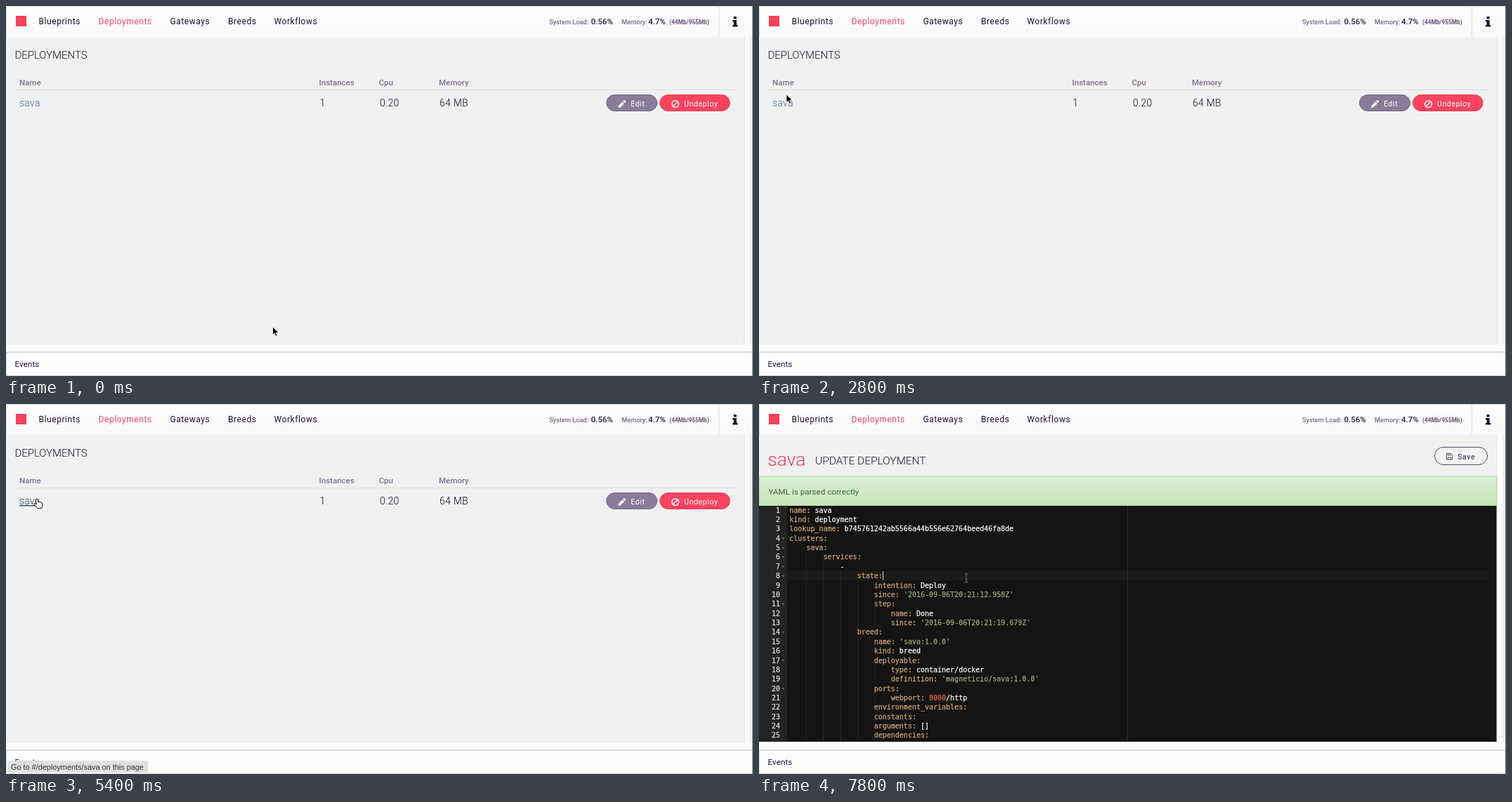
An HTML page that plays this animation: 1063x527 px, repeating every 8000 ms.

```html
<!DOCTYPE html>
<html lang="en">
<head>
<meta charset="utf-8">
<title>Deployments</title>
<style>
html, body { margin: 0; width: 100%; height: 100%; overflow: hidden; background: #fff; }
svg { display: block; width: 1063px; height: 527px; }
text { font-family: Roboto, Arial, sans-serif; white-space: pre; }
.nav { font-size: 12px; letter-spacing: .57px; fill: #1d0f2c; }
.title { font-size: 15px; font-weight: 300; letter-spacing: -.04px; fill: #1d1326; }
.head { font-size: 11.5px; font-weight: 500; fill: #7f7190; }
.cell { font-size: 14px; font-weight: 300; letter-spacing: .25px; fill: #180c24; }
.btn { font-size: 10.5px; letter-spacing: .6px; fill: #fff; }
.label { font-size: 9.2px; font-weight: 500; fill: #74668a; }
.stat { font-size: 11.5px; font-weight: 500; fill: #2b2136; }
.code { font: 10px "DejaVu Sans Mono", monospace; }
.code, .code tspan { fill: currentColor; stroke: currentColor; stroke-width: .25px; }
.code { color: #f8f8f8; }
.key { color: #c7a474; }
.str { color: #9ba77c; }
.num { color: #d9694c; }
</style>
</head>
<body>
<svg id="stage" viewBox="0 0 1063 527"></svg>
<script>
const LOOP = 8000, STEP = 200, ROW = 13.37, CHAR = 6.02, LEFT = 43.3;

const text = (x, y, cls, str, extra = '') => `<text x="${x}" y="${y}" class="${cls}" ${extra}>${str}</text>`;
const rect = (x, y, w, h, fill, extra = '') =>
  `<rect x="${x}" y="${y}" width="${w}" height="${h}" fill="${fill}" ${extra}/>`;
const line = (d, stroke, extra = '') => `<path d="${d}" fill="none" stroke="${stroke}" ${extra}/>`;

const yaml = `name: sava
kind: deployment
lookup_name: b745761242ab5566a44b556e62764beed46fa8de
clusters:
    sava:
        services:
            -
                state:
                    intention: Deploy
                    since: '2016-09-06T20:21:12.958Z'
                    step:
                        name: Done
                        since: '2016-09-06T20:21:19.679Z'
                breed:
                    name: 'sava:1.0.0'
                    kind: breed
                    deployable:
                        type: container/docker
                        definition: 'magneticio/sava:1.0.0'
                    ports:
                        webport: 8080/http
                    environment_variables:
                    constants:
                    arguments: []
                    dependencies:
                environment_variables:`.split('\n');
const folds = [4, 5, 6, 7, 8, 11, 14, 17, 20];

const span = (cls, str) => `<tspan class="${cls}">${str}</tspan>`;
const paint = src => src
  .replace(/'.*'/, s => span('str', s))
  .replace(/\b8080\b/, s => span('num', s))
  .replace(/^( *)(\w+:)/, (_, pad, key) => pad + span('key', key));

function codeRow(src, i) {
  const y = 154.6 + i * ROW, top = 144.3 + i * ROW;
  const indent = src.search(/\S/);
  let out = text(30, y, 'code', i + 1, 'text-anchor="end" style="color:#dcdcdc"');
  if (folds.includes(i + 1)) out += `<path d="M32.5 ${y - 4.2}h4l-2 2.4z" fill="#777"/>`;
  for (let c = 4; c < indent; c += 4)
    out += line(`M${Math.round(LEFT + c * CHAR) + .5} ${top}v${ROW}`, '#272727');
  return out + text(LEFT, y, 'code', paint(src));
}

const header = `
  ${rect(0, 0, 1063, 44, 'url(#bar)')}
  ${line('M.5 44V.5H1063', '#d8d8d8')}
  ${line('M1014.5 1V44', '#dedede')}
  ${rect(14, 14, 15, 15, '#f3425f')}
  ${text(46.5, 26, 'nav', 'Blueprints')}
  ${text(131.5, 26, 'nav', 'Deployments', 'style="fill:#ee4a68"')}
  ${text(233.5, 26, 'nav', 'Gateways')}
  ${text(316, 26, 'nav', 'Breeds')}
  ${text(381.5, 26, 'nav', 'Workflows')}
  ${text(773, 26, 'label', 'System Load:')}
  ${text(832.5, 26, 'stat', '0.56%')}
  ${text(876, 26, 'label', 'Memory:')}
  ${text(914, 26, 'stat', '4.7%')}
  ${text(944, 26, 'label', '(44Mb/955Mb)', 'style="font-size:8.3px;font-weight:700;fill:#65547a"')}
  <path d="M1035.5 15h4v3.4h-4zM1034 20h5.6v7h1.6v2.4h-7.2V27h1.6v-4.6H1034z" fill="#1b0d2b"/>`;

const footer = `
  ${rect(0, 482, 1063, 11, '#fcfcfc')}
  ${line('M0 493H1063', '#d3d3d3', 'stroke-width="1.5"')}
  ${rect(0, 494, 1063, 33, '#fefefd')}
  ${text(12.5, 514, 'nav', 'Events', 'style="font-size:11.5px;letter-spacing:.15px"')}
  ${line('M0 526.5H1063', '#d0d0d0')}
  ${line('M.5 494V527', '#d8d8d8')}
  ${line('M1062.5 0V527', '#56705a')}`;

const list = `
  ${text(12.5, 74.5, 'title', 'DEPLOYMENTS')}
  ${text(19, 113, 'head', 'Name')}
  ${text(445.5, 113, 'head', 'Instances')}
  ${text(530.5, 113, 'head', 'Cpu')}
  ${text(616, 113, 'head', 'Memory')}
  ${line('M12 119.5H1038', '#d4d4d4', 'stroke-dasharray="2 1"')}
  ${text(19, 143, 'cell', 'sava', 'id="link"')}
  ${text(446.5, 143, 'cell', '1')}
  ${text(532, 143, 'cell', '0.20')}
  ${text(617, 143, 'cell', '64 MB')}
  ${rect(854.5, 126.5, 72, 23, '#897b9a', 'rx="11.5" stroke="#776a87"')}
  <path d="M871 145l.8-3.3 5.4-5.4 2.6 2.6-5.4 5.4zM878 135.5l1-1q.9-.7 1.7 0l1 1q.7.9 0 1.7l-1 1z" fill="#fff"/>
  ${text(889, 143, 'btn', 'Edit')}
  ${rect(930.5, 126.5, 99.5, 23, '#fb4360', 'rx="11.5" stroke="#e2455d"')}
  <circle cx="952.5" cy="139.5" r="4.8" fill="none" stroke="#fff" stroke-width="1.5"/>
  ${line('M949.2 142.8l6.6-6.6', '#fff', 'stroke-width="1.5"')}
  ${text(965, 143, 'btn', 'Undeploy')}`;

const editor = `
  ${rect(1051, 44, 7, 438, '#fdfdfd')}
  ${text(12.5, 87.5, 'title', 'sava', 'style="font-size:26.4px;fill:#e63f5e"')}
  ${text(80, 85.5, 'title', 'UPDATE DEPLOYMENT', 'style="font-size:15.5px"')}
  ${rect(961.5, 61.5, 75, 25, '#f4f4f4', 'rx="12.5" stroke="#51465f"')}
  ${line('M978.5 70.5h6l2 2v6.5h-8zM980.5 70.5v2.5h3.5v-2.5M980.5 79v-3h4v3', '#5a5066')}
  ${text(994, 78.5, 'btn', 'Save', 'style="fill:#554b61;font-weight:500"')}
  ${rect(.5, 103, 1049, 41.5, 'url(#ok)', 'stroke="#b6dba8"')}
  ${text(13.5, 129, 'nav', 'YAML is parsed correctly', 'style="font-size:11.6px;letter-spacing:.03px;fill:#386a40"')}
  <g clip-path="url(#pane)">
    ${rect(0, 144, 1050, 338, '#141414')}
    ${rect(0, 144, 40, 338, '#232323')}
    ${rect(40, 144.3, 997, ROW, '#1b1b1b', 'id="active"')}
    ${line('M524.5 144V482', '#2a2a2a')}
    ${yaml.map(codeRow).join('')}
    <path id="caret" d="M.5 .5v12.5" stroke="#ddd"/>
  </g>`;

const pointers = `
  <path id="arrow" d="M0 0V11.6L2.7 9.1 4.6 13.2 6.6 12.3 4.8 8.3H8.4Z" fill="#000" stroke="#fff" stroke-width=".8"/>
  <path id="hand" d="M-1.3 1Q0-1 1.3 1L2.4 4.5Q3.5 3.6 4.4 4.8 5.6 4 6.4 5.3 8 5 8.2 6.8L8.4 10 7.3 13.5H1.2L-1 10.6-3.7 7.8Q-3.6 6-1.9 6.7L.2 8Z" fill="#fff" stroke="#111"/>
  <path id="beam" d="M-2.5-6.5Q0-6.5 0-5V5Q0 6.5-2.5 6.5M2.5-6.5Q0-6.5 0-5M0 5Q0 6.5 2.5 6.5M-1.5 2h3" fill="none" stroke="#6a6a6a"/>`;

const stage = document.getElementById('stage');
stage.innerHTML = `
  <defs>
    <linearGradient id="bar" x2="0" y2="1"><stop stop-color="#fff"/><stop offset="1" stop-color="#f9f9f9"/></linearGradient>
    <linearGradient id="ok" x2="0" y2="1"><stop stop-color="#dcefd4"/><stop offset="1" stop-color="#c6e5ba"/></linearGradient>
    <clipPath id="pane"><rect y="145" width="1049.5" height="336"/></clipPath>
  </defs>
  ${rect(0, 0, 1063, 527, '#f8f8f8')}
  ${rect(0, 44, 1050, 438, '#f1f1f1')}
  ${line('M1050.5 44V482H0', '#e2e2e2')}
  ${rect(1058, 44, 4, 438, '#efefef')}
  ${header}
  <g id="list">${list}</g>
  <g id="editor">${editor}</g>
  ${footer}
  <g id="bubble">
    ${rect(2, 508, 200, 17, '#dfdfdf', 'rx="3" opacity=".94"')}
    ${text(7, 521, '', 'Go to #/deployments/sava on this page', 'style="font:10.9px Liberation Sans,Arial,sans-serif;fill:#333"')}
  </g>
  ${pointers}`;

const el = id => document.getElementById(id);
const show = (id, on) => el(id).setAttribute('display', on ? 'inline' : 'none');
const move = (id, x, y) => el(id).setAttribute('transform', `translate(${x} ${y})`);

// time, x, y of the pointer
const path = [
  [0, 379.5, 457], [1800, 379.5, 457], [2000, 367, 433.5], [2800, 39, 126], [3800, 39, 126],
  [4400, 43.3, 135], [5400, 43.3, 135], [6200, 908.5, 133], [6600, 908.5, 133], [7400, 295, 248], [LOOP, 295, 248]
];

function pointerAt(t) {
  const i = path.findIndex(p => p[0] > t);
  const [t0, x0, y0] = path[i - 1], [t1, x1, y1] = path[i];
  const k = (t - t0) / (t1 - t0), e = k * k * (3 - 2 * k);
  return [x0 + (x1 - x0) * e, y0 + (y1 - y0) * e];
}

function draw(now) {
  const t = Math.floor(now % LOOP / STEP) * STEP;
  const [x, y] = pointerAt(t);
  const editing = t >= 6400, clicked = t >= 7600;
  const onLink = t >= 4400 && t <= 5400;
  const hand = onLink || t >= 6000 && !editing;
  const beam = editing && y > 146;

  show('list', !editing);
  show('editor', editing);
  show('bubble', t >= 4600 && t <= 5400);
  el('link').style.fill = onLink ? '#23456a' : '#456b92';
  el('link').style.textDecoration = onLink ? 'underline' : 'none';

  move('active', 0, clicked ? 7 * ROW : 0);
  move('caret', clicked ? 176 : 43, 144.3 + (clicked ? 7 * ROW : 0));

  const shape = hand ? 'hand' : beam ? 'beam' : 'arrow';
  for (const id of ['arrow', 'hand', 'beam']) show(id, id === shape);
  move(shape, x, y);
  requestAnimationFrame(() => draw(performance.now()));
}
draw(performance.now());
</script>
</body>
</html>
```
